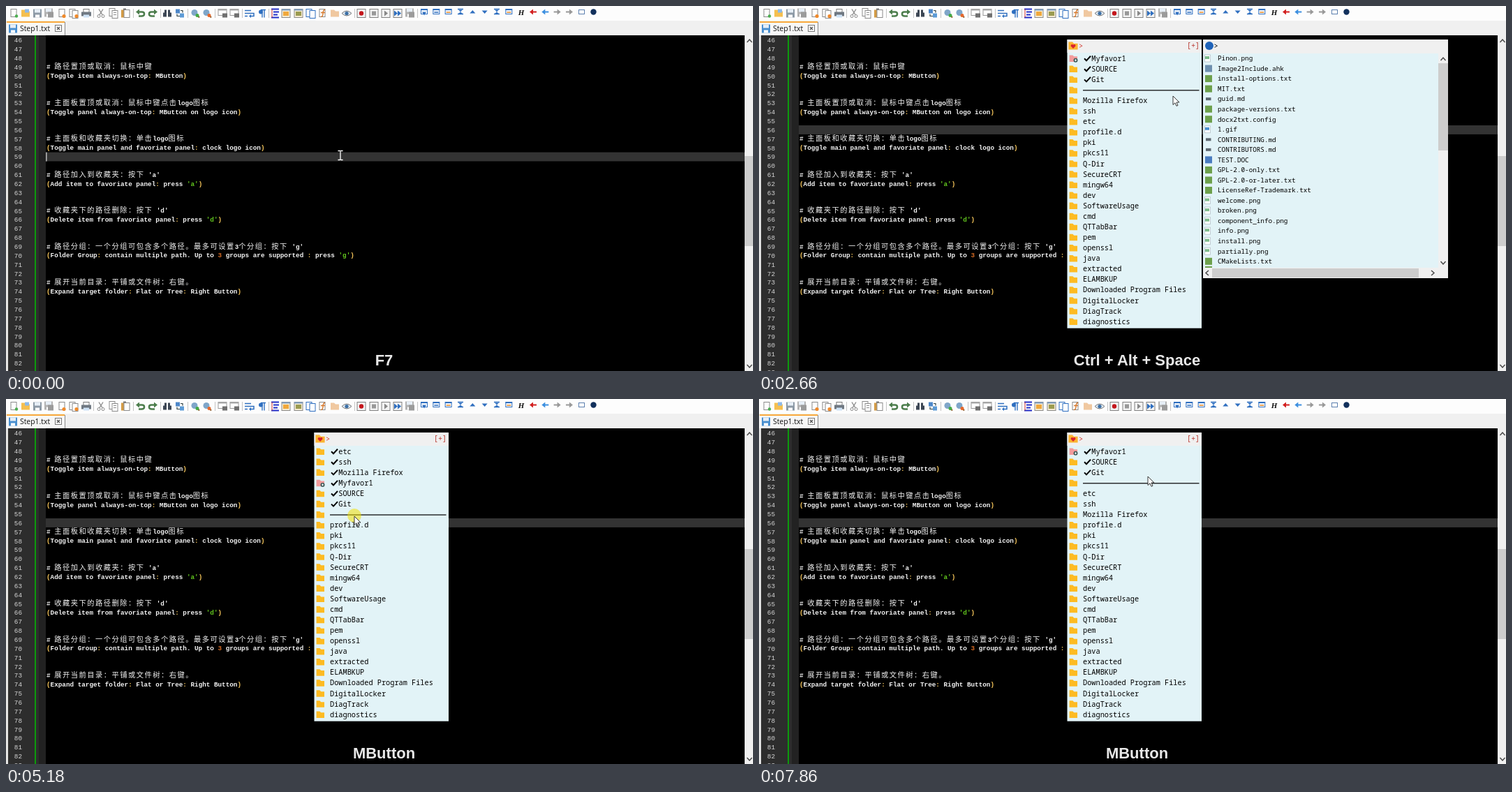
Animation of 1070x523 px, one loop 8000 ms. Source, as an HTML page:

```html
<!DOCTYPE html>
<html lang="en">
<head>
<meta charset="utf-8">
<title>Folder panel</title>
<style>
html, body { margin: 0; width: 100%; height: 100%; overflow: hidden; background: #000; }
svg { display: block; }
text { white-space: pre; }
.code { font: bold 9.3px "Liberation Mono", monospace; fill: #f4f4f4; }
.cjk { font: 500 10.25px "Noto Sans CJK SC", "Noto Sans CJK", sans-serif; letter-spacing: 1.5px; }
.num { font: 9.3px "Liberation Mono", monospace; fill: #d6d6d6; text-anchor: end; }
.item { font: 10.28px "Noto Sans Mono", monospace; fill: #000; }
.file { font: 9.3px "Noto Sans Mono", monospace; fill: #000; }
.ui { font: 10.4px "Open Sans", sans-serif; fill: #111; }
.key { font: bold 22px "Liberation Sans", Arial, sans-serif; fill: #e8e8e8; text-anchor: middle; }
</style>
</head>
<body>
<svg id="stage" width="1070" height="523" viewBox="0 0 1070 523"></svg>
<script>
const LOOP = 8000;
const stage = document.getElementById('stage');

const rect = (x, y, w, h, fill, more = '') =>
  `<rect x="${x}" y="${y}" width="${w}" height="${h}" fill="${fill}" ${more}/>`;
const path = (d, fill, stroke = 'none', width = 1) =>
  `<path d="${d}" fill="${fill}" stroke="${stroke}" stroke-width="${width}"/>`;
const line = (d, stroke, width = 1) => path(d, 'none', stroke, width);
const dot = (x, y, r, fill, more = '') => `<circle cx="${x}" cy="${y}" r="${r}" fill="${fill}" ${more}/>`;
const text = (x, y, cls, s, more = '') => `<text x="${x}" y="${y}" class="${cls}" ${more}>${s}</text>`;
const move = (x, y, s) => `<g transform="translate(${x} ${y})">${s}</g>`;
const rowY = n => 49 + (n - 46) * 12.86;

// Toolbar pictograms, each drawn around its own centre
const sheet = (x = -4, y = -6, edge = '#8a8a8a') => rect(x, y, 8, 11, '#fff', `stroke="${edge}"`);
const floppy = c => rect(-6, -6, 12, 12, c) + rect(-4, -6, 8, 5, '#e6eef6') + rect(-3, 2, 6, 4, '#fff');
const dir = c => path('M-6 5V-5H-1L1 -3H6V5Z', c);
const frame = c => rect(-4.5, -4, 9, 7, '#fff', `stroke="${c}"`) + rect(-4.5, -4, 9, 1.6, c);
const gray = '#8b8b8b', blue = '#2f6fc0';
const icon = {
  create: () => sheet() + dot(4, 4, 2.2, '#4caf50'),
  open: () => dir('#f5bf4f') + rect(-1, -6, 6, 5, '#8db9e8'),
  save: () => floppy('#8d9aa6'),
  saveAll: () => move(-1, -1, floppy('#b3b3b3')) + move(2, 2, rect(-4, -4, 8, 8, '#9b9b9b')),
  close: () => sheet() + dot(3, 4, 2.6, '#f08a2c'),
  closeAll: () => sheet(-6) + sheet(-2, -4) + dot(4, 4, 2.6, '#f08a2c'),
  print: () => rect(-4, -6, 8, 5, '#fff', 'stroke="#777"') + rect(-7, -2, 14, 6, '#6f7882') + rect(-4, 2, 8, 4, '#cfe3f7'),
  cut: () => line('M-3 -6L2 2M3 -6L-2 2', gray, 1.4) + dot(-3, 4, 2, 'none', 'stroke="#888"') + dot(3, 4, 2, 'none', 'stroke="#888"'),
  copy: c => sheet(-6, -7, c) + sheet(-2, -4, c) + line('M0 -1H4M0 2H4', c),
  paste: () => rect(-6, -5, 10, 11, '#d39b45') + rect(-3, -7, 4, 3, '#777') + move(2, 1, sheet()),
  undo: () => line('M-4 -2H2Q5 -2 5 1T1 4H-3', '#4c7d4c', 2.6) + path('M-7 -2L-2 -6V2Z', '#4c7d4c'),
  redo: () => `<g transform="scale(-1 1)">${icon.undo()}</g>`,
  find: () => rect(-6, -1, 5, 6, '#3c4654') + rect(1, -1, 5, 6, '#3c4654') + rect(-4, -5, 3, 5, '#3c4654') + rect(1, -5, 3, 5, '#3c4654'),
  replace: () => rect(-6, -6, 6, 6, '#4d87c9') + rect(0, 0, 6, 6, '#5d9bd6') + line('M-4 1V4H0M1 -4H4V-1', '#344', 1.2),
  zoom: c => line('M2 2L6 6', '#8a5a2b', 2) + dot(-1, -1, 4.5, '#7fa6c9') + dot(3, 3, 2.5, c),
  sync: () => rect(-6, -6, 12, 9, '#fff', 'stroke="#999"') + rect(-6, -6, 12, 2, '#aaa') + rect(0, 0, 7, 6, '#707070'),
  wrap: () => line('M-7 -4H2M-7 0H6V4H1M-7 4H-3', blue, 1.5) + path('M-1 4L2 1.5V6.5Z', blue),
  mark: () => line('M1 -5V6M4 -5V6M-1 -5H6', blue, 1.4) + dot(-1, -2, 3, blue),
  indent: () => line('M-5 -6H6M-2 -2H6M-2 2H4M-5 6H6', '#2530c8', 1.8) + line('M-4 -6V6', '#c33', 1),
  view: c => rect(-6, -6, 12, 12, '#f7ecd2', 'stroke="#8a8a8a"') + rect(-4, -2.5, 8, 6, c) + rect(-6, -6, 12, 2, '#7f9fc4'),
  func: () => sheet(-5) + line('M3 -5Q0 -5 0 0T-3 5M-3 -1H3', '#d5772a', 1.4),
  pages: () => sheet(-6, -6, blue) + sheet(-1, -4, blue),
  dir: c => dir(c),
  eye: () => path('M-7 0Q0 -7 7 0Q0 7 -7 0Z', '#dfe9f2', '#777') + dot(0, 0, 2.6, '#3c6fa5'),
  tape: s => rect(-6, -6, 12, 12, '#f3f3f3', 'stroke="#808080"') + s,
  frame: c => frame(blue) + line('M-3 0.5H3', c, 1.6),
  pin: () => frame(blue) + path('M-3 0H3L0 5Z', blue),
  bars: () => line('M-4 -4H4M-4 3H4', blue, 1.3) + path('M-3 -3H3L0 0L3 2.5H-3L0 0Z', blue),
  tri: s => path(`M-4 ${2 * s}H4L0 ${-2.5 * s}Z`, blue),
  note: () => text(-4, 4, 'ui', 'H', 'style="font:italic bold 11px Liberation Serif,serif"'),
  arrow: (c, s) => `<g transform="scale(${s} 1)">${line('M-5 0H2', c, 2) + path('M0 -4L5 0L0 4Z', c)}</g>`,
};
const tools = [
  [11, 'create'], [28, 'open'], [45, 'save'], [62, 'saveAll'], [80, 'close'], [97, 'closeAll'], [115, 'print'],
  [136, 'cut'], [154, 'copy', gray], [171, 'paste'], [193, 'undo'], [210, 'redo'], [231, 'find'], [249, 'replace'],
  [271, 'zoom', '#4a4'], [288, 'zoom', '#e5682c'], [310, 'sync'], [327, 'sync'], [349, 'wrap'], [366, 'mark'],
  [385, 'indent'], [401, 'view', '#f0a83c'], [419, 'view', '#9b9b50'], [436, 'pages'], [454, 'func'],
  [471, 'dir', '#f0c8a0'], [488, 'eye'], [509, 'tape', dot(0, 0, 3.2, '#c4161c')],
  [527, 'tape', rect(-3, -3, 6, 6, '#999')], [544, 'tape', path('M-2 -4L3 0L-2 4Z', '#888')],
  [561, 'tape', path('M-5 -4L0 0L-5 4ZM0 -4L5 0L0 4Z', blue)], [579, 'saveAll'],
];
const marks = [
  ['pin'], ['frame', blue], ['frame', '#e08a2c'], ['bars'], ['tri', 1], ['tri', -1], ['bars'],
  ['frame', '#e08a2c'], ['note'], ['arrow', '#d21f1f', -1], ['arrow', '#3c8fe0', -1], ['arrow', '#999', 1], ['arrow', '#999', 1],
];

function chrome() {
  let s = rect(0, 0, 1070, 21, '#fdfdfd') + rect(0, 21, 1070, 21, '#f0f0f0');
  for (const [x, kind, arg] of tools) s += move(x, 10.5, icon[kind](arg));
  for (const x of [125, 182, 221, 260, 299, 338, 376, 499, 589]) s += rect(x, 4, 1, 13, '#c4c4c4');
  marks.forEach(([kind, a, b], i) => s += move(599 + i * 17.33, 8.5, icon[kind](a, b)));
  s += move(824.5, 8.5, rect(-4, -3, 8, 6, '#fff', 'stroke="#5c7fae"')) + dot(841.5, 8.5, 4.2, '#12305c');
  s += rect(1, 22, 83, 20, '#f7f7f7') + rect(1, 22, 83, 2, '#faaa3c') + rect(84, 23, 1, 19, '#888');
  s += move(10, 32.5, floppy('#4a90d0')) + text(20, 36.3, 'ui', 'Step1.txt');
  return s + rect(70.5, 27.5, 9, 9, '#fff', 'stroke="#777"') + line('M73 30L77 34M77 30L73 34', '#555', 1.4);
}

const notes = {
  49: '# 路径置顶或取消：鼠标中键',
  50: '(Toggle item always-on-top: MButton)',
  53: '# 主面板置顶或取消：鼠标中键点击logo图标',
  54: '(Toggle panel always-on-top: MButton on logo icon)',
  57: '# 主面板和收藏夹切换：单击logo图标',
  58: '(Toggle main panel and favoriate panel: clock logo icon)',
  61: "# 路径加入到收藏夹：按下 'a'",
  62: "(Add item to favoriate panel: press 'a')",
  65: "# 收藏夹下的路径删除：按下 'd'",
  66: "(Delete item from favoriate panel: press 'd')",
  69: "# 路径分组：一个分组可包含多个路径。最多可设置3个分组：按下 'g'",
  70: "(Folder Group: contain multiple path. Up to 3 groups are supported : press 'g')",
  73: '# 展开当前目录：平铺或文件树：右键。',
  74: '(Expand target folder: Flat or Tree: Right Button)',
};
const tint = c => m => `<tspan fill='${c}'>${m}</tspan>`;
const paint = s => s[0] === '#'
  ? s.replace(/[\u3000-\uffef]+/g, m => `<tspan class="cjk">${m}</tspan>`)
  : s.replace(/'\w'|[():]|\b3\b/g, m =>
      tint(m[0] === "'" ? '#63c71e' : m === '3' ? '#d96c24' : '#f7c65a')(m));

function editorText() {
  let s = '';
  for (let n = 46; n < 84; n++) s += text(23, rowY(n) + 3.2, 'num', n);
  for (const n in notes) s += text(58, rowY(n) + 2.8, 'code', paint(notes[n]));
  return s;
}

const chevron = (x, y, dx, dy) => dx
  ? line(`M${x - 2 * dx} ${y - 3.5}L${x + 2 * dx} ${y}L${x - 2 * dx} ${y + 3.5}`, '#444', 1.4)
  : line(`M${x - 3.5} ${y - 2 * dy}L${x} ${y + 2 * dy}L${x + 3.5} ${y - 2 * dy}`, '#444', 1.4);
const scrollbar = rect(1058, 42, 12, 481, '#f0f0f0') + rect(1058, 215, 12, 129, '#cdcdcd') +
  chevron(1065, 50, 0, -1) + chevron(1065, 516, 0, 1);

// Folder panel
const rest = ['profile.d', 'pki', 'pkcs11', 'Q-Dir', 'SecureCRT', 'mingw64', 'dev', 'SoftwareUsage', 'cmd', 'QTTabBar',
  'pem', 'openssl', 'java', 'extracted', 'ELAMBKUP', 'Downloaded Program Files', 'DigitalLocker', 'DiagTrack', 'diagnostics'];
const toggles = [[3760, 'Mozilla Firefox'], [4850, 'ssh'], [5180, 'etc'],
  [6600, 'Mozilla Firefox'], [7070, 'ssh'], [7430, 'etc']];

function folderRows(t) {
  let pins = ['Myfavor1', 'SOURCE', 'Git'], free = ['Mozilla Firefox', 'ssh', 'etc'];
  for (const [when, name] of toggles) {
    if (when > t) break;
    const pinned = pins.includes(name);
    pins = pins.filter(n => n !== name);
    free = free.filter(n => n !== name);
    (pinned ? free : pins).unshift(name);
  }
  return [...pins, '', ...free, ...rest].map((name, i) => {
    const y = 75.2 + i * 15.08, own = name === 'Myfavor1', pinned = i < pins.length;
    let s = move(450.3, y, `<g transform="scale(.95)">${dir(own ? '#f29b9b' : '#fdbb22')}</g>`);
    if (own) s += dot(453.5, y + 2.5, 3, '#3d5d5a') + line(`M452 ${y + 2.5}h3m-1.5 -1.5v3`, '#fff');
    if (!name) return s + rect(464, y - .3, 166.5, 1.3, '#111');
    if (pinned) s += line(`M466 ${y}L469 ${y + 3}L475 ${y - 3.5}`, '#000', 2);
    return s + text(pinned ? 476.3 : 464, y + 3.5, 'item', name);
  }).join('');
}
const folderBox = rect(441.5, 48, 192.5, 413.7, '#e2f3f7') + rect(441.5, 48, 192.5, 19, '#f0f0f0') +
  move(450, 57, `<g transform="scale(1.1)">${dir('#fbb431')}</g>` + path('M0 4L-3.4 .5Q-3.6 -2.4 -1.4 -2T0 -.6Q0 -2.4 2 -2T3.4 .5Z', '#d9232e')) +
  text(458, 60.5, 'item', '&gt;', 'style="fill:#d0342c"') + text(612.8, 60.2, 'item', '[+]', 'style="fill:#b8352c"');

const files = ['Pinon.png', 'Image2Include.ahk', 'install-options.txt', 'MIT.txt', 'guid.md', 'package-versions.txt',
  'docx2txt.config', '1.gif', 'CONTRIBUTING.md', 'CONTRIBUTORS.md', 'TEST.DOC', 'GPL-2.0-only.txt', 'GPL-2.0-or-later.txt',
  'LicenseRef-Trademark.txt', 'welcome.png', 'broken.png', 'component_info.png', 'info.png', 'install.png', 'partially.png', 'CMakeLists.txt'];
function fileIcon(name, y) {
  const type = name.split('.').pop();
  const solid = { ahk: '#6d8fae', txt: '#6da04c', config: '#6da04c', DOC: '#4a7cc0' }[type];
  if (solid) return rect(639, y - 5, 10, 10, solid);
  if (type === 'md') return rect(640, y - 2, 7.5, 4, '#5d6870');
  return rect(638.5, y - 5, 8, 10, '#fff', 'stroke="#b4c0c6" stroke-width=".8"') +
    rect(639, y - 3, 6, 4, type === 'gif' ? '#4a90d0' : '#7dbb8a');
}
function filePanel() {
  let s = rect(636, 48, 351, 342, '#f0f0f0') + rect(636, 68, 337, 307, '#e2f3f7');
  s += dot(645, 57, 6, '#1f62b8') + text(651.5, 60.5, 'item', '&gt;');
  files.forEach((name, i) => {
    const y = 75 + i * 14.54;
    s += fileIcon(name, y) + text(657, y + 3.3, 'file', name);
  });
  s += rect(639, 373, 10, 2, '#6da04c') + rect(973, 82, 14, 125, '#cdcdcd') + rect(649, 376, 296, 13, '#cdcdcd');
  return s + chevron(980, 76, 0, -1) + chevron(980, 368, 0, 1) + chevron(642, 382.5, -1) + chevron(965, 382.5, 1);
}

const arrowPath = 'M0 0V12.5L3 9.8L5 14.3L7 13.4L5 9H9Z';
const pointers = {
  beam: line('M-3.5 -6.5H-1L0 -6L1 -6.5H3.5M0 -6V6M-3.5 6.5H-1L0 6L1 6.5H3.5', '#fff', 1.3),
  flip: `<g transform="scale(-1 1)">${path(arrowPath, '#fff', '#222', .7)}</g>`,
  arrow: path(arrowPath, '#fff', '#222', .9),
};

// Timetables: start time, then value
const caption = [[0, 'F7'], [330, ''], [700, 'LButton'], [2400, 'Ctrl + Alt + Space'], [3470, ''],
  [3690, 'MButton'], [6000, ''], [6500, 'MButton']];
const current = [[0, 59], [700, 51], [880, 50], [1150, 49], [1980, 56]];
const selected = [[0, ''], [880, 'part'], [1010, 'one'], [1150, 'two'], [1980, '']];
const pointer = [[0, 'beam'], [1080, 'flip'], [1600, 'beam'], [2530, 'arrow']];
const presses = [[700, 1490], [1980, 2100], [3690, 3830], [4720, 4900], [5040, 5240], [6500, 6700], [6980, 7130], [7350, 7500]];
const hints = [[4400, 4950, 557, 134, 'Git\\etc\\ssh'], [6270, 6800, 557, 84, 'Mozilla Firefox'],
  [6890, 7150, 551, 77, 'Git\\etc\\ssh'], [7250, 7730, 551, 60, 'Git\\etc']];
const route = [[260, 479, 214], [650, 130, 114], [760, 130, 114], [1010, 66, 102], [1080, 40, 96], [1150, 35, 91],
  [1490, 35, 91], [1840, 330, 174], [1910, 330, 174], [2060, 480, 178], [2180, 480, 178], [2420, 593, 129],
  [2850, 593, 129], [3060, 552, 106], [3270, 511, 131], [3800, 511, 131], [4300, 501, 149], [4850, 501, 149],
  [5040, 499, 168], [5570, 499, 168], [5700, 499, 92], [6000, 499, 92], [6140, 499, 99], [6800, 499, 99],
  [6900, 495, 92], [7130, 495, 92], [7240, 495, 77], [7670, 495, 77], [7860, 557, 111]];

const at = (table, t) => table.filter(r => r[0] <= t).pop()[1];
function along(t) {
  const i = route.findIndex(p => p[0] > t);
  if (i <= 0) return route.at(i).slice(1);
  const [t0, x0, y0] = route[i - 1], [t1, x1, y1] = route[i], k = (t - t0) / (t1 - t0);
  return [x0 + (x1 - x0) * k, y0 + (y1 - y0) * k];
}

stage.innerHTML = rect(0, 0, 1070, 523, '#000') + rect(0, 42, 3, 481, '#e4e4e4') +
  rect(3, 42, 44, 481, '#2d2d2d') + rect(47, 42, 10, 481, '#222') + rect(41, 42, 2, 481, '#0c9a0c') +
  '<g id="under"></g>' + editorText() + scrollbar + chrome() +
  `<g id="panel">${folderBox}<g id="rows"></g></g><g id="side">${filePanel()}</g><g id="over"></g>` +
  text(541.5, 515, 'key', '', 'id="caption"') + '<g id="mouse"></g>';

const part = id => document.getElementById(id);
const cache = {};
function put(id, html) {
  if (cache[id] !== html) part(id).innerHTML = cache[id] = html;
}
const show = (id, on) => part(id).setAttribute('display', on ? 'inline' : 'none');

function underlay(t) {
  const y = rowY(at(current, t)) - 6.6, sel = at(selected, t), blueSel = '#659bd3';
  let s = rect(57, y, 1001, 12.9, '#333');
  if (t < 70) s += rect(57.4, y, 1, 13, '#fff');
  if (sel === 'two') s += rect(57.5, rowY(49) - 6.5, 158, 13, blueSel);
  if (sel) s += sel === 'part' ? rect(92, rowY(50) - 6.5, 172, 13, blueSel) : rect(57.5, rowY(50) - 6.5, 207, 13, blueSel);
  return s;
}

function hint(t) {
  const h = hints.find(([from, to]) => t >= from && t < to);
  if (!h) return '';
  const [from, , x, y, tail] = h, label = 'D:\\Program Files\\' + tail;
  const w = label.length * 4.98 + 3, alpha = Math.min(1, (t - from) / 260);
  return `<g opacity="${alpha.toFixed(2)}">` + rect(x, y, w, 15, '#fbfbfb', 'stroke="#aaa" stroke-width=".8"') +
    text(x + 4, y + 11.3, 'ui', label, 'style="fill:#575757"') + '</g>';
}

function draw(t) {
  put('under', underlay(t));
  put('rows', folderRows(t));
  put('over', hint(t));
  put('caption', at(caption, t));
  show('panel', t >= 2530);
  show('side', t >= 2530 && t < 3760);
  const [x, y] = along(t), pressed = presses.some(([a, b]) => t >= a && t < b);
  put('mouse', move(x.toFixed(1), y.toFixed(1),
    (pressed ? dot(0, -1, 10, '#f2e000', 'opacity=".54"') : '') + pointers[at(pointer, t)]));
}

const start = performance.now();
function tick() {
  draw((performance.now() - start) % LOOP);
  requestAnimationFrame(tick);
}
tick();
</script>
</body>
</html>
```
